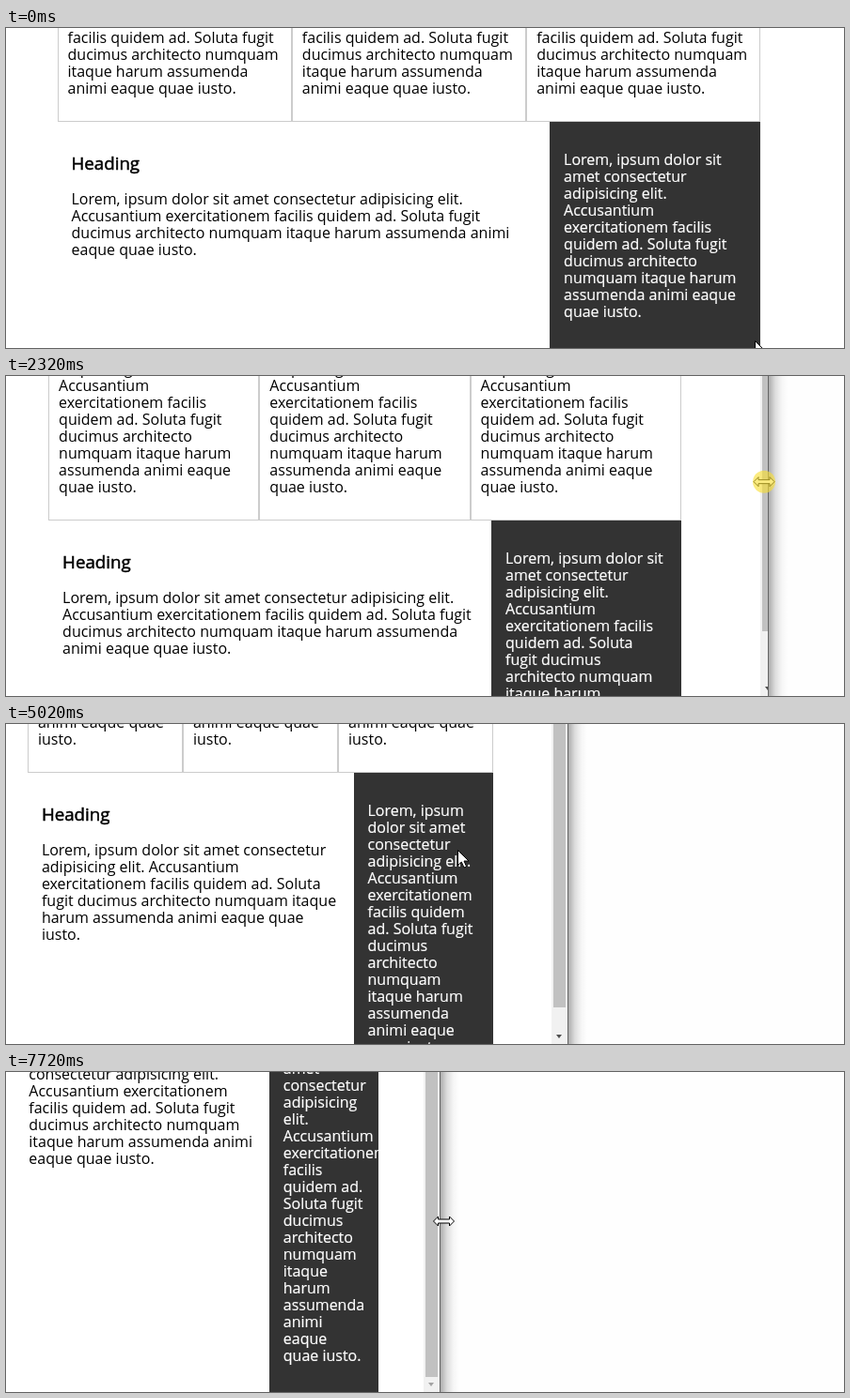
An HTML page for the animation above (8 s loop, 891 by 341 pixels).

```html
<!DOCTYPE html>
<html lang="en">
<head>
<meta charset="utf-8">
<title>Responsive layout</title>
<style>
  html, body { margin: 0; width: 100%; height: 100%; overflow: hidden; background: #fefefe; }
  #stage { position: relative; width: 891px; height: 341px; overflow: hidden;
    font: 16px/18px "Open Sans", sans-serif; color: #000; }
  #win, #shade, #page, #bar, #bar div, svg { position: absolute; top: 0; box-sizing: border-box; }
  #win { left: -39px; height: 342px; background: #fff; overflow: hidden; border-right: 1px solid #666; }
  #shade { width: 20px; height: 341px;
    background: linear-gradient(90deg, rgba(0,0,0,.32), rgba(0,0,0,.13) 7px, rgba(0,0,0,.03) 14px, transparent); }
  #cards, #row { display: flex; }
  section, main, aside { box-sizing: border-box; flex: none; }
  section { width: 33.3333%; padding: 10px 11px 10px 10px; border: 1px solid #ccc; }
  main { width: 70%; padding: 15px; }
  aside { width: 30%; padding: 15px; background: #333; color: #fff; overflow: hidden; -webkit-text-stroke: .2px #fff; }
  p { margin: 16px 0; }
  main p { margin-top: 0; }
  h3 { margin: 18.72px 0; font-size: 18.72px; line-height: 20.6px; font-weight: 400; -webkit-text-stroke: .5px #000; }
  #bar { width: 17px; height: 342px; background: #f1f1f1; }
  #thumb { left: 2px; width: 13px; }
  #bar #down { left: 5px; top: 331px; border: solid transparent; border-width: 4px 3.5px 0; }
  svg { left: 0; overflow: visible; }
</style>
</head>
<body>
<div id="stage">
  <div id="win">
    <div id="page">
      <div id="cards"></div>
      <div id="row"><main><h3>Heading</h3></main><aside></aside></div>
    </div>
    <div id="bar"><div id="thumb"></div><div id="down"></div></div>
  </div>
  <div id="shade"></div>
  <svg id="cursor" width="1" height="1">
    <g fill="#fff" stroke="#000">
      <path id="arrow" d="M.5.5V16.5L4.3 13 7 19 9.6 17.9 7 12H12Z"/>
      <path id="resize" d="M-11 0L-6-5V-2H6V-5L11 0 6 5V2H-6V5Z"/>
    </g>
    <circle id="press" r="12" fill="rgba(248,222,50,.62)"/>
  </svg>
</div>
<script>
const $ = id => document.getElementById(id);
const lorem = '<p>Lorem, ipsum dolor sit amet consectetur adipisicing elit. Accusantium exercitationem facilis quidem ad. Soluta fugit ducimus architecto numquam itaque harum assumenda animi eaque quae iusto.</p>';
for (const tag of ['main', 'aside'])
  document.querySelector(tag).insertAdjacentHTML('beforeend', lorem);
$('cards').innerHTML = `<section>${lorem}</section>`.repeat(3);

const STEP = 77;          // ms between screen refreshes
const HEIGHT = 342;       // visible height of the page
const FRAME = 22;         // page width minus x of the window's edge

// Key points of the window's right edge: three drags
const edgePath = [[1380, 913], [1688, 881], [1765, 875], [2458, 791],
  [4100, 791], [4177, 786], [4254, 757], [4639, 597],
  [6430, 597], [6661, 526], [6738, 491], [6969, 461]];
const dragStarts = [1380, 4100, 6430];

// Free pointer moves; while dragging the pointer follows the edge
const pointerPath = [[0, 796, 333], [230, 729, 190], [450, 850, 72], [530, 915, 87], [1765, 913, 87],
  [2458, 791, 120], [2750, 668, 128], [3250, 668, 128], [3550, 803, 138], [3870, 795, 144],
  [4639, 597, 146], [5024, 480, 134], [5250, 480, 134], [5710, 602, 165], [5800, 606, 154],
  [6110, 603, 164], [6430, 603, 164], [6661, 523, 159], [6969, 461, 158], [7100, 360, 140], [7450, 360, 140], [7650, 465.5, 159]];

// After each drag the page is scrolled to its end
const scrollStarts = [2873, 4891, 7150];
const SCROLL = 200;

const clamp01 = v => Math.min(1, Math.max(0, v));
const mix = (a, b, u) => a + (b - a) * u;
function at(path, t, col = 1) {
  const i = path.findIndex(p => p[0] > t);
  if (i < 0) return path.at(-1)[col];
  if (i === 0) return path[0][col];
  const a = path[i - 1], b = path[i];
  return mix(a[col], b[col], (t - a[0]) / (b[0] - a[0]));
}
const px = (id, props) => { for (const p in props) $(id).style[p] = props[p] + 'px'; };
const show = (id, on) => $(id).style.display = on ? '' : 'none';

function layOut(view) {
  px('page', { left: view * .1, width: view * .8 });
  return HEIGHT - $('page').offsetHeight;   // page top when scrolled to the end
}
const restTops = [913, 791, 597, 461].map(edge => layOut(edge + FRAME));

function draw(t) {
  const edge = Math.round(at(edgePath, t));
  const view = Math.round(at(edgePath, t - STEP)) + FRAME;   // layout trails the window
  const n = scrollStarts.filter(s => s <= t).length;
  const top = n ? mix(restTops[n - 1], restTops[n], clamp01((t - scrollStarts[n - 1]) / SCROLL)) : restTops[0];
  const rest = Math.max(0, Math.round(top) - layOut(view));

  px('win', { width: edge + 40 });
  px('shade', { left: edge + 1 });
  px('page', { top: Math.round(top) });
  px('bar', { left: view });
  px('thumb', { height: HEIGHT - 17 - rest * view / 1150 });

  const dragging = at(edgePath, t + 1) !== at(edgePath, t);
  const x = dragging ? at(edgePath, t + 30) : at(pointerPath, t);
  const resizing = Math.abs(x - edge) < 8 || dragging;
  $('thumb').style.background = !resizing && x > view - 39 && x < edge ? '#a8a8a8' : '#c1c1c1';
  $('down').style.borderTopColor = rest ? '#505050' : '#a3a3a3';
  $('cursor').style.transform = `translate(${x}px,${at(pointerPath, t, 2)}px)`;
  show('arrow', !resizing);
  show('resize', resizing);
  show('press', dragging);
}

function loop() {
  const t = performance.now() % 8000;
  const start = dragStarts.findLast(s => s <= t) ?? 0;
  draw(start + Math.floor((t - start + 8) / STEP) * STEP);
  requestAnimationFrame(loop);
}
loop();
</script>
</body>
</html>
```
